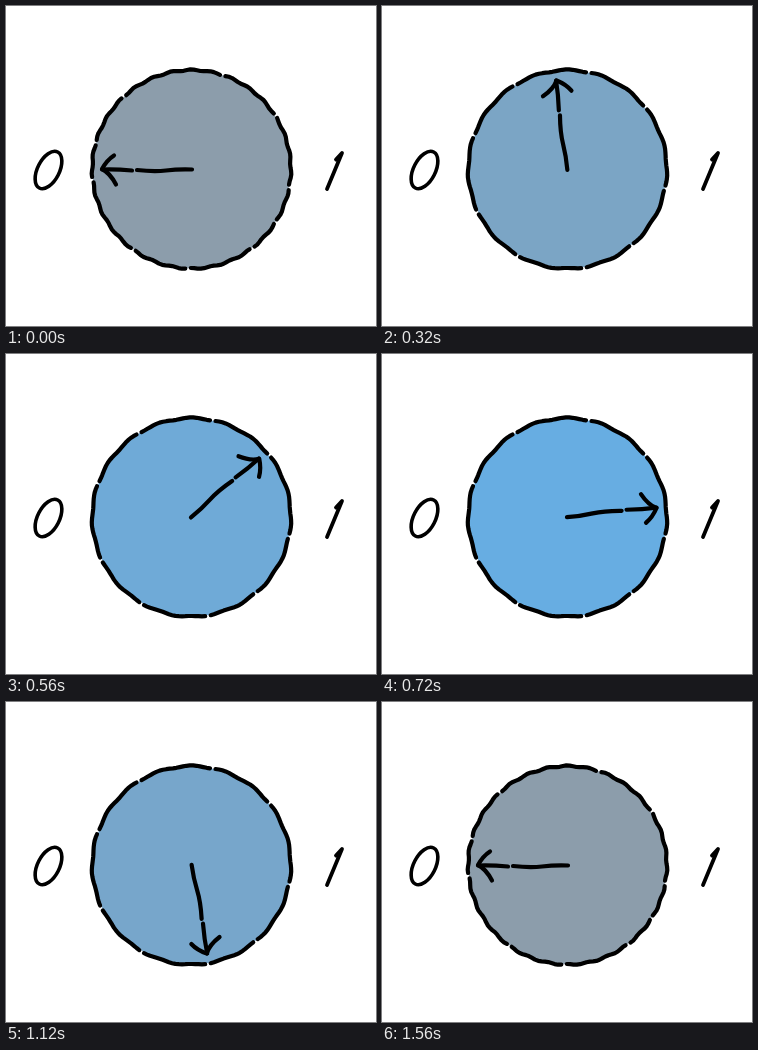
An HTML page for the animation above (1600 ms loop, 370x320 px).

```html
<!DOCTYPE html>
<html lang="en">
<head>
<meta charset="utf-8">
<title>Dial</title>
<style>
  html, body { margin: 0; width: 100%; height: 100%; overflow: hidden; background: #fff; }
  svg { display: block; }
  .ink { fill: none; stroke: #000; stroke-width: 4.2; stroke-linecap: round; stroke-linejoin: round; }
</style>
</head>
<body>
<svg width="370" height="320" viewBox="0 0 370 320">
  <circle id="disc" cx="185.5" cy="163.3" r="99"/>
  <path id="rim" class="ink"/>
  <g id="arrow" class="ink">
    <path d="M186 163.500Q172 163 160 164.500T131 164M126 164.500Q110 163 96 163.500"/>
    <path d="M108 149.500Q101 154 96 163Q104 167 110 178.500"/>
  </g>
  <ellipse class="ink" style="stroke-width:3.6" rx="10.9" ry="20.2" transform="translate(42.5 164) rotate(27)"/>
  <path class="ink" style="stroke-width:3.8" d="M330 153.500L336 147L321 183"/>
</svg>
<script>
const FRAME = 40, LAST = 39;
const CX = 185.5, CY = 163.3, RADIUS = 99.3, HALF_GAP = 1.6;
const low = [140, 157, 171], high = [102, 174, 228];
const [disc, rim, arrow] = ['disc', 'rim', 'arrow'].map(id => document.getElementById(id));

// Slightly wavy circle, lifted at the given angles (degrees, clockwise from the right).
function wavyRim(gaps, waves) {
  return gaps.map((gap, i) => {
    const from = gap + HALF_GAP;
    const to = (gaps[i + 1] ?? gaps[0] + 360) - HALF_GAP;
    const count = Math.ceil((to - from) / 2);
    const points = Array.from({ length: count + 1 }, (_, k) => {
      const a = (from + (to - from) * k / count) * Math.PI / 180;
      const r = RADIUS + 0.6 * Math.sin(waves * a);
      return `${(CX + r * Math.cos(a)).toFixed(1)} ${(CY + r * Math.sin(a)).toFixed(1)}`;
    });
    return 'M' + points.join(' ');
  }).join('');
}

const restRim = wavyRim([-71.6, -32.6, 10.5, 32, 52.4, 92, 126, 174, 195.6, 227], 31);
const turnRim = wavyRim([-77.6, -38.5, 11, 49.7, 80.5, 120, 154.6, 199.8, 238], 19);

function draw(now) {
  const step = Math.floor(now / FRAME) % (LAST + 1);
  const p = step / LAST;
  // One turn, running a little ahead early on.
  const angle = 360 * p + 215 * p ** 1.5 * (1 - p) ** 3.5;
  const level = 1 - Math.abs(angle - 180) / 180;
  disc.setAttribute('fill', `rgb(${low.map((c, i) => Math.round(c + (high[i] - c) * level))})`);
  rim.setAttribute('d', step % LAST ? turnRim : restRim);
  arrow.setAttribute('transform', `rotate(${angle} ${CX} ${CY})`);
}

const start = performance.now();
function tick() {
  draw(performance.now() - start);
  requestAnimationFrame(tick);
}
tick();
</script>
</body>
</html>
```
